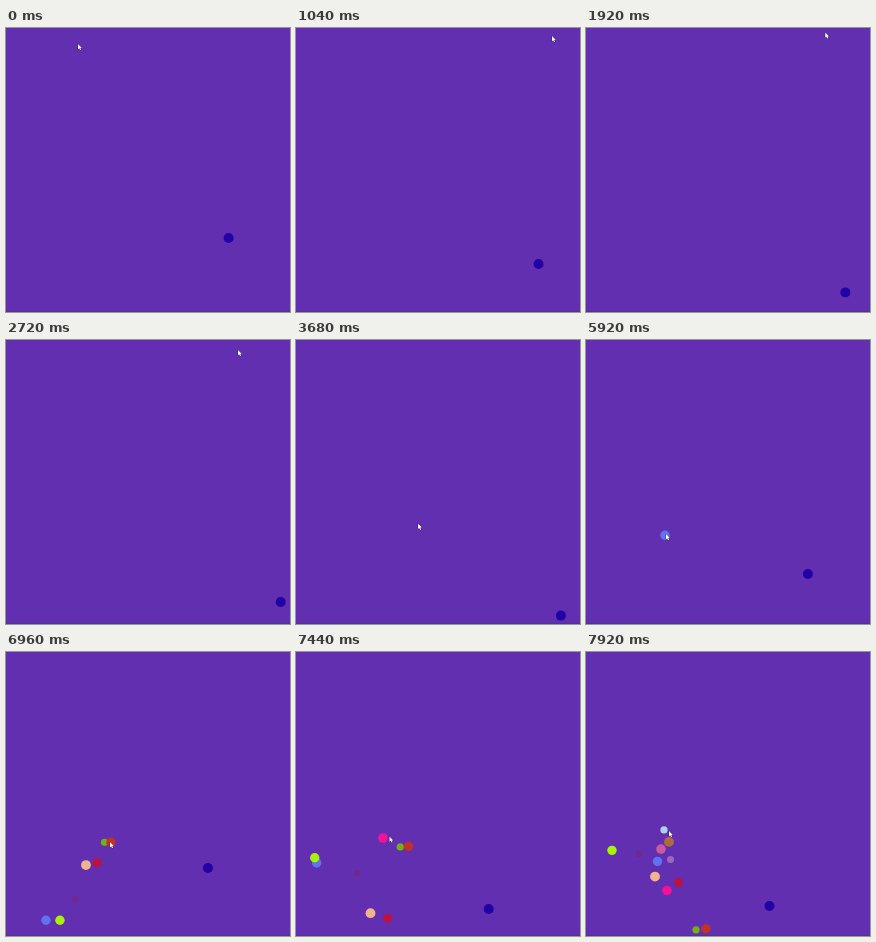
These frames come from a looping animation (284 by 284 pixels, 8 s). An HTML page with a canvas:

```html
<!DOCTYPE html>
<html lang="en">
<head>
<meta charset="utf-8">
<title>Bouncing balls</title>
<style>
  html, body { margin: 0; width: 100%; height: 100%; overflow: hidden; background: #632fb1; }
  canvas { display: block; width: 284px; height: 284px; }
</style>
</head>
<body>
<canvas id="stage"></canvas>
<script>
const SIZE = 284, LOOP = 8000, STEP = 80, PULL = 1.7e-4;
const canvas = document.getElementById('stage');
const ctx = canvas.getContext('2d');
const ratio = window.devicePixelRatio || 1;
canvas.width = canvas.height = SIZE * ratio;
ctx.scale(ratio, ratio);

// hops: times of floor contact; x: [time, position] keys; drop: held still until then
const balls = [
  { color: '#2100a8', r: 5, born: 0, x: [[0, 222.6], [2945, 279], [7920, 183.5]],
    hops: [-524, 775, 1995, 2858, 3654, 4450, 5290, 6340, 7558, 8326] },
  { color: '#5f73ee', r: 4.7, born: 5840, drop: 6305, hops: [5602, 7008, 8371],
    x: [[5920, 79], [6160, 75], [6305, 110], [7290, 4.7], [7920, 71.5]] },
  { color: '#a8f20a', r: 4.7, born: 6305, hops: [5602, 7008, 8442],
    x: [[6305, 102], [7631, 4.7], [7920, 26]] },
  { color: '#6d2a8a', r: 3.3, born: 6386, hops: [5662, 7110, 8494], x: [[6386, 79], [7920, 53]] },
  { color: '#f0b48c', r: 4.9, born: 6635, hops: [5932, 7338, 8471], x: [[6635, 83.7], [7920, 69]] },
  { color: '#bb1246', r: 4.6, born: 6660, hops: [5957, 7363, 8437], x: [[6660, 90.5], [7920, 92.5]] },
  { color: '#74b010', r: 3.6, born: 6900, hops: [6414, 7930], x: [[6960, 98.5], [7920, 110]] },
  { color: '#c23026', r: 4.7, born: 6900, hops: [6420, 7930], x: [[6960, 105], [7920, 120]] },
  { color: '#f5129a', r: 4.8, born: 7360, hops: [6613, 8103], x: [[7360, 88], [7920, 81]] },
  { color: '#9a68bd', r: 3.5, born: 7537, hops: [6778, 8296], x: [[7537, 87], [7920, 84.5]] },
  { color: '#cb5a9b', r: 4.8, born: 7636, hops: [6885, 8387], x: [[7636, 80], [7920, 75]] },
  { color: '#ad6c3c', r: 4.9, born: 7707, hops: [6952, 8462], x: [[7707, 84], [7920, 83]] },
  { color: '#a9d2ea', r: 3.6, born: 7840, hops: [7092, 8648], x: [[7840, 78], [7920, 78]] }
];

const pointer = [
  [160, 72, 16], [560, 165, 22], [960, 253, 13], [1040, 256, 8], [1280, 254, 1],
  [1840, 240, 4], [2720, 232, 10], [2880, 230, 12], [3520, 125, 182], [3900, 118, 186],
  [4480, 116, 188], [4640, 109, 188], [5360, 82, 192], [5920, 80, 194], [6160, 76, 192],
  [6305, 102, 190], [6960, 104, 190], [7920, 83, 179]
];

function along(keys, t, axis = 1) {
  if (t <= keys[0][0]) return keys[0][axis];
  for (let i = 1; i < keys.length; i++) {
    const a = keys[i - 1], b = keys[i];
    if (t <= b[0]) return a[axis] + (b[axis] - a[axis]) * (t - a[0]) / (b[0] - a[0]);
  }
  return keys[keys.length - 1][axis];
}

function height(hops, t) {
  const i = hops.findIndex(hop => hop > t);
  return PULL * (t - hops[i - 1]) * (hops[i] - t);
}

function drawBall(ball, t) {
  if (t < ball.born) return;
  const y = SIZE - ball.r - height(ball.hops, Math.max(t, ball.drop || 0));
  ctx.fillStyle = ball.color;
  ctx.beginPath();
  ctx.arc(along(ball.x, t), y, ball.r, 0, 2 * Math.PI);
  ctx.fill();
}

function drawPointer(t) {
  ctx.save();
  ctx.translate(along(pointer, t), along(pointer, t, 2));
  const arrow = new Path2D('M0 0V5.2L1.2 4.2L2 6H3L2.3 3.9H3.8Z');
  ctx.strokeStyle = 'rgba(25, 10, 50, .6)';
  ctx.lineWidth = 0.8;
  ctx.stroke(arrow);
  ctx.fillStyle = '#fff';
  ctx.fill(arrow);
  ctx.restore();
}

function draw(t) {
  ctx.fillStyle = '#632fb1';
  ctx.fillRect(0, 0, SIZE, SIZE);
  ctx.fillStyle = '#54319a';
  ctx.fillRect(0, SIZE - 1, SIZE, 1);
  balls.forEach(ball => drawBall(ball, t));
  drawPointer(t);
}

const start = performance.now();
function tick() {
  const t = Math.floor((performance.now() - start) % LOOP / STEP) * STEP;
  draw(t < 2 * STEP ? 0 : t);
  requestAnimationFrame(tick);
}
tick();
</script>
</body>
</html>
```
